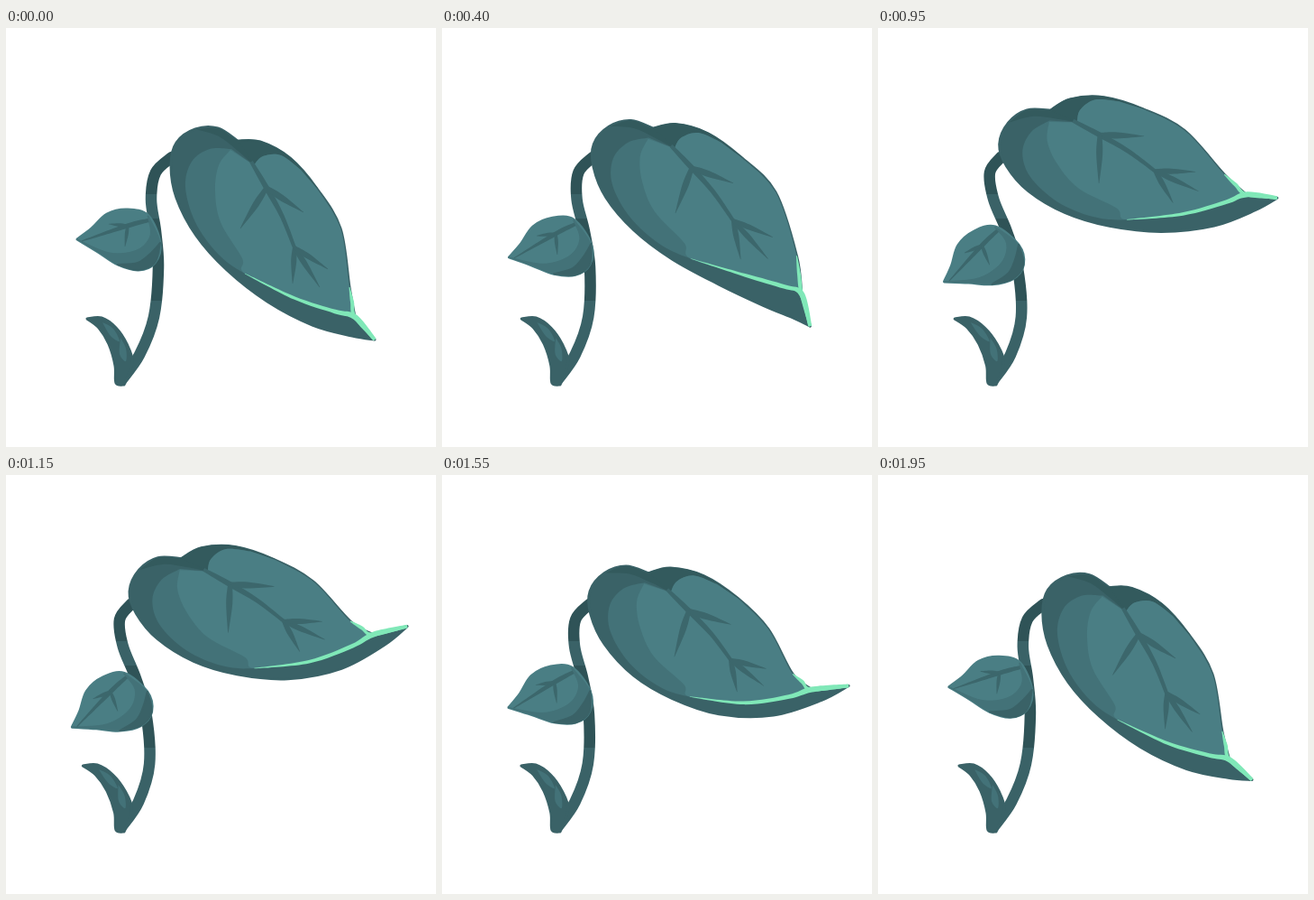
An HTML page with a canvas for the animation above (2000 ms loop, 477 by 464 pixels).

```html
<!DOCTYPE html>
<html lang="en">
<head>
<meta charset="utf-8">
<title>Swaying leaf</title>
<style>
html, body { margin: 0; width: 100%; height: 100%; overflow: hidden; background: #fff; }
canvas { display: block; }
</style>
</head>
<body>
<canvas id="stage" width="477" height="464"></canvas>
<script>
const ctx = document.getElementById('stage').getContext('2d');
const LOOP = 2000, STEP = 50, RAD = Math.PI / 180;
const LIGHT = '#4a7e84', MID = '#437278', RIM = '#3a6267', VEIN = '#3c676c';
const DARK = '#335a5d', STEM = '#2f5357', MINT = '#80e8b8';

// Key points of the drooping pose; the motion rules below move them.
const leaf = {
  left: [[257,125], [235,111], [210,112], [189,127], [183,152], [189,188], [211,230], [245,268]],
  right: [[257,125], [282,126], [315,144], [345,178], [371,222], [381,287], [387,320]],
  under: [[290,303], [340,329], [384,341], [409,345]],
  fold: [[265,272], [320,299], [365,314], [387,320]],
  inner: [[250,134], [226,134], [206,148], [199,176], [210,215], [235,250]],
  glow: [[249,135], [236,152], [232,180], [238,215], [262,255]],
  lobe: [[275,152], [285,142], [305,141], [327,157]],
  cap: [[275,152], [257,136], [236,120], [210,112]],
  rib: [[272,148], [289,177], [306,208], [320,243]],
  upper: [[289,177], [330,204], [260,222]],
  lower: [[320,243], [318,283], [348,287], [357,267]]
};
const bud = {
  ring: [[79,234], [95,222], [112,206], [135,201], [158,208], [171,238], [165,260], [147,268], [124,262], [102,248], [79,234]],
  shade: [[79,234], [115,249], [145,246], [160,230], [157,208]],
  rim: [[124,262], [146,260], [160,250], [171,238]],
  rib: [[84,236], [135,219], [158,213]],
  twigs: [[135,219], [114,217], [132,242]]
};
const sprout = {
  outer: [[90,322], [106,321], [122,332], [134,350], [140,370], [131,395]],
  back: [[131,395], [122,393], [121,374], [114,350], [103,332], [90,322]],
  spots: [[[107,326], [119,333], [126,347], [116,341]], [[127,343], [133,355], [133,369], [126,361]]]
};
const stem = [[184,143], [166,160], [161,190], [166,225], [169,265], [164,320], [148,362], [128,390]];

const mapParts = (parts, move) =>
  Object.fromEntries(Object.entries(parts).map(([name, pts]) => [name, pts.map(move)]));

const polar = (r, a) => [r * Math.cos(a), r * Math.sin(a)];
const clamp = v => Math.max(0, Math.min(1, v));

function turn([x, y], pivot, angle, dx, dy) {
  const px = x - pivot[0], py = y - pivot[1];
  const [qx, qy] = polar(Math.hypot(px, py), Math.atan2(py, px) + angle * RAD);
  return [pivot[0] + qx + dx, pivot[1] + qy + dy];
}

// The stem leans more the higher it is.
const lean = p => ([x, y]) => [x - 48 * p * Math.max(0, (392 - y) / 249) ** 1.8, y];

// The leaf turns about its notch while the far end whips behind.
function swing(p, lift, whip) {
  const notch = leaf.left[0];
  return pt => {
    const dx = pt[0] - notch[0], dy = pt[1] - notch[1], r = Math.hypot(dx, dy);
    const far = Math.max(0, (r - 150) / 117) ** 2;
    const angle = Math.atan2(dy, dx) + (far * (10 * whip - 4 * p * p) - 32 * lift) * RAD;
    const [x, y] = polar(r + 13 * whip * clamp((r - 120) / 120), angle);
    return [notch[0] - 66 * p + x, notch[1] - 34 * lift + y];
  };
}

function curve(path, pts, first) {
  if (first) path.moveTo(...pts[0]); else path.lineTo(...pts[0]);
  for (let i = 0; i < pts.length - 1; i++) {
    const a = pts[i - 1] || pts[i], b = pts[i], c = pts[i + 1], d = pts[i + 2] || c;
    path.bezierCurveTo(b[0] + (c[0] - a[0]) / 6, b[1] + (c[1] - a[1]) / 6,
      c[0] - (d[0] - b[0]) / 6, c[1] - (d[1] - b[1]) / 6, c[0], c[1]);
  }
}

// Smooth runs joined by corners, with an optional edge of the same colour.
function shape(color, runs, edge = 0) {
  const path = new Path2D();
  runs.forEach((run, i) => curve(path, run, i === 0));
  path.closePath();
  ctx.fillStyle = ctx.strokeStyle = color;
  ctx.fill(path);
  if (edge) {
    ctx.lineWidth = edge;
    ctx.stroke(path);
  }
}

function ribbon(color, pts, widths) {
  const side = sign => pts.map((pt, i) => {
    const a = pts[i - 1] || pt, b = pts[i + 1] || pt;
    const dx = b[0] - a[0], dy = b[1] - a[1], len = Math.hypot(dx, dy) || 1;
    const h = sign * widths[i] / 2;
    return [pt[0] - dy / len * h, pt[1] + dx / len * h];
  });
  shape(color, [side(1), side(-1).reverse()]);
}

const mix = (a, b, u) => [a[0] + (b[0] - a[0]) * u, a[1] + (b[1] - a[1]) * u];
const flip = pts => pts.slice().reverse();

function branches([fork, ...ends], width) {
  for (const end of ends) ribbon(VEIN, [fork, mix(fork, end, 0.4), end], [width * 0.7, width, 0.5]);
}

function drawStem(p) {
  const path = new Path2D();
  curve(path, stem.map(lean(p)), true);
  ctx.lineWidth = 12.5;
  for (const [top, bottom, color] of [[0, 184, STEM], [184, 211, RIM], [211, 302, STEM], [302, 464, RIM]]) {
    ctx.save();
    ctx.beginPath();
    ctx.rect(0, top, 477, bottom - top);
    ctx.clip();
    ctx.strokeStyle = color;
    ctx.stroke(path);
    ctx.restore();
  }
}

function drawSprout(p) {
  const move = lean(p);
  shape(RIM, [sprout.outer.map(move), sprout.back.map(move)], 3);
  for (const spot of sprout.spots) shape(MID, [[...spot, spot[0]].map(move)]);
}

function drawBud(lift) {
  const b = mapParts(bud, pt => turn(pt, [160, 225], -29 * lift, -20 * lift, 9 * lift));
  shape(LIGHT, [b.ring], 3);
  shape(MID, [b.shade, b.ring.slice(4)], 1);
  shape(RIM, [b.ring.slice(5, 9), b.rim], 2);
  ribbon(VEIN, b.rib, [1, 5, 4]);
  branches(b.twigs, 4);
}

function drawLeaf(p, lift, whip) {
  const l = mapParts(leaf, swing(p, lift, whip));
  const tip = l.under[3], bend = l.right[5], corner = l.right[6];
  const face = flip(l.right.slice(3)), lobe = flip(l.lobe);

  shape(RIM, [l.left.concat(l.under), [tip, corner], flip(l.right)], 3);
  shape(DARK, [l.right.slice(0, 4), lobe], 2);
  shape(DARK, [flip(l.left.slice(0, 3)), l.cap]);
  shape(MID, [l.inner.concat(l.fold), face, lobe]);
  shape(LIGHT, [l.glow.concat(l.fold), face, lobe]);

  ribbon(VEIN, l.rib, [4, 6, 5, 4]);
  branches(l.upper, 7);
  branches(l.lower, 6);

  ribbon(MINT, [...l.fold, tip], [0.5, 3.5, 4.5, 6, 4]);
  ribbon(MINT, [bend, mix(bend, corner, 0.5), corner, tip], [1, 4, 4, 3]);
}

function draw(t) {
  const phase = 2 * Math.PI * t / LOOP;
  const p = (1 - Math.cos(phase)) / 2;
  const lift = p ** 0.85;
  ctx.fillStyle = '#fff';
  ctx.fillRect(0, 0, 477, 464);
  ctx.lineCap = ctx.lineJoin = 'round';
  drawStem(p);
  drawSprout(p);
  drawBud(lift);
  drawLeaf(p, lift, Math.sin(phase));
}

const begin = performance.now();
function tick() {
  const t = (performance.now() - begin) % LOOP;
  draw(Math.floor(t / STEP) * STEP);
  requestAnimationFrame(tick);
}
draw(0);
requestAnimationFrame(tick);
</script>
</body>
</html>
```
